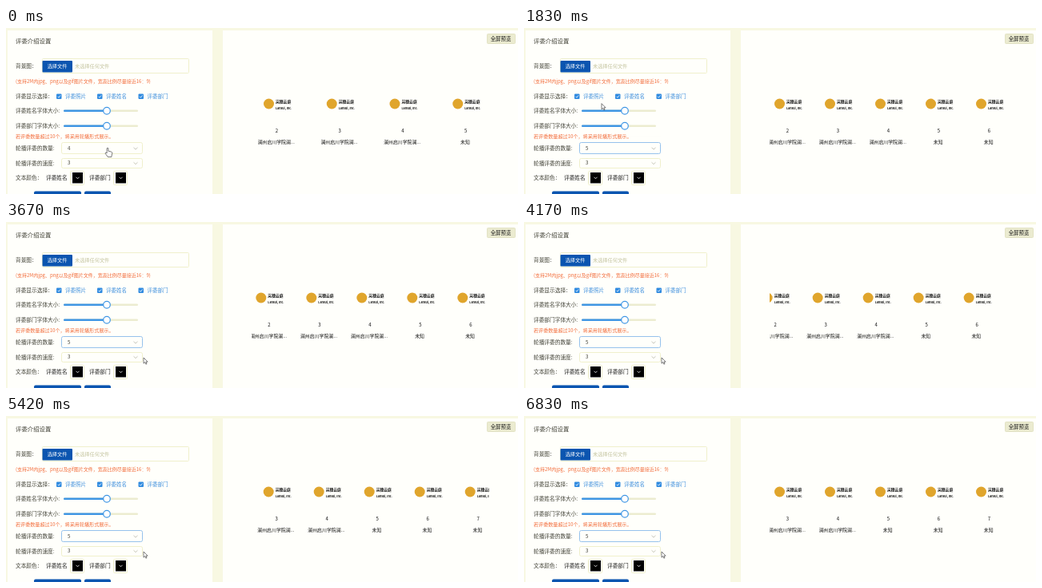
Write an HTML page that moves like this. It is 640 by 208 pixels and loops after 8 s.

```html
<!DOCTYPE html>
<html lang="zh-CN">
<head>
<meta charset="utf-8">
<title>评委介绍设置</title>
<style>
  html, body { margin: 0; width: 100%; height: 100%; overflow: hidden; background: #fffffb; }
  svg { display: block; }
  text { font: 6.7px "Noto Sans CJK SC", "Noto Sans CJK", "Noto Sans", sans-serif; fill: #404036; dominant-baseline: central; }
  #form text, #menu text { transform: translateY(-.6px); }
  .small { font-size: 6.2px; }
  .warn { font-size: 6px; fill: #f26a38; }
  .blue { font-size: 6.5px; fill: #3f8fdc; }
  .middle { text-anchor: middle; }
  .field { fill: #fffffb; stroke: #f0f0cc; }
  .button { fill: #0b55b0; }
  .chevron { fill: none; stroke: #b8b8aa; stroke-width: .8; }
  .cursor { fill: #fff; stroke: #444; stroke-width: .7; stroke-linejoin: round; }
</style>
</head>
<body>
<svg width="640" height="208" viewBox="0 0 640 208">
  <defs><clipPath id="window"><rect x="307" y="60" width="297" height="100"/></clipPath></defs>
  <rect width="640" height="208" fill="#fffffb"/>
  <path d="M0 0H640V3H271V208H258V3H2V208H0Z" fill="#f8f8e2"/>

  <g id="form">
    <text x="12" y="16" style="font-size:7.4px">评委介绍设置</text>
    <text x="12" y="48">背景图：</text>
    <rect class="field" x="45.5" y="38.5" width="183" height="18" rx="1"/>
    <rect class="button" x="45.5" y="41" width="37.5" height="14.5" rx="1"/>
    <text class="small middle" x="64" y="48.5" style="fill:#fff">选择文件</text>
    <text class="small" x="86" y="48.5" style="fill:#c4c4a0">未选择任何文件</text>
    <text class="warn" x="12" y="67">(支持2M内jpg、png以及gif图片文件，宽高比例尽量接近16：9)</text>
    <text x="12" y="86">评委显示选择：</text>
    <text x="12" y="104">评委姓名字体大小:</text>
    <text x="12" y="123">评委部门字体大小:</text>
    <text class="warn" x="12" y="136.5" style="font-size:6.1px">若评委数量超过10个，将采用轮播形式展示。</text>
    <text x="12" y="151">轮播评委的数量:</text>
    <text x="12" y="169.5">轮播评委的速度:</text>
    <text x="12" y="188">文本颜色：</text>
    <text x="50" y="188" style="fill:#222">评委姓名</text>
    <text x="104" y="188" style="fill:#222">评委部门</text>
    <rect id="select" class="field" x="69.5" y="143.5" width="101" height="14" rx="2"/>
    <text id="value" class="small" x="77" y="151"></text>
    <path id="arrow" class="chevron" d="M-2.5 -1.2L0 1.2L2.5 -1.2"/>
    <rect class="field" x="69.5" y="163.5" width="101" height="12" rx="2"/>
    <text class="small" x="77" y="169.5">3</text>
    <path class="chevron" d="M159.5 168.3l2.5 2.4l2.5 -2.4"/>
    <rect class="button" x="35" y="204.5" width="59" height="16" rx="2"/>
    <rect class="button" x="98" y="204.5" width="33" height="16" rx="2"/>
  </g>

  <rect x="601.5" y="7.5" width="35" height="12" rx="1" fill="#ebebd0" stroke="#e2e2c4"/>
  <text class="middle" x="618.5" y="13" style="font-size:6.4px;fill:#111">全屏预览</text>
  <g id="carousel" clip-path="url(#window)"></g>

  <g id="menu">
    <rect class="field" x="69.5" y="12.5" width="101" height="123" rx="2"/>
    <rect id="hover" x="70" width="96" height="16" fill="#f8f8ee"/>
    <g id="options"></g>
    <rect id="scrollbar" x="166" y="15" width="3" height="108" rx="1.5" fill="#d6d7d2"/>
  </g>

  <path id="hand" class="cursor" d="M-.9 .8Q0 -.7 .9 .8V4.2L4.7 5.1Q6 5.6 5.7 7.2L4.8 11.6H.3L-2.8 7.3Q-3 5.9-1.8 6.1L-.9 7Z"/>
  <path id="pointer" class="cursor" d="M0 0V7.2L1.7 5.7L2.9 8.2L4 7.7L2.9 5.2H5.1Z"/>
</svg>

<script>
const LOOP = 8000, STEP = 1000 / 12, PICK = 1648;
const $ = id => document.getElementById(id);

function add(parent, tag, attributes, content = "") {
  const node = document.createElementNS("http://www.w3.org/2000/svg", tag);
  for (const name in attributes) node.setAttribute(name, attributes[name]);
  node.textContent = content;
  return parent.appendChild(node);
}

const clamp = v => Math.min(1, Math.max(0, v));

// CSS-style cubic-bezier timing function, solved by bisection.
function bezier(x1, y1, x2, y2) {
  const at = (s, a, b) => 3 * a * s * (1 - s) ** 2 + 3 * b * s * s * (1 - s) + s ** 3;
  return x => {
    if (x <= 0 || x >= 1) return clamp(x);
    let low = 0, high = 1;
    for (let i = 0; i < 24; i++) {
      const mid = (low + high) / 2;
      if (at(mid, x1, x2) < x) low = mid; else high = mid;
    }
    return at(low, y1, y2);
  };
}
const ease = bezier(.25, .1, .25, 1);
const easeOut = bezier(.23, 1, .32, 1);

// Repeated form controls
[["评委照片", 63], ["评委姓名", 114], ["评委部门", 165.5]].forEach(([label, x]) => {
  add($("form"), "rect", { x, y: 82.5, width: 6.5, height: 6.5, rx: 1, fill: "#318be0" });
  add($("form"), "path", { d: `M${x + 1.5} 85.8l1.4 1.4l2.2 -2.8`, fill: "none", stroke: "#fff", "stroke-width": .8 });
  add($("form"), "text", { x: x + 11, y: 86, class: "blue" }, label);
});
for (const y of [104, 123]) {
  add($("form"), "rect", { x: 72, y: y - 1.5, width: 93, height: 2.5, rx: 1.2, fill: "#ececd0" });
  add($("form"), "rect", { x: 72, y: y - 1.5, width: 54, height: 2.5, rx: 1.2, fill: "#3f96e4" });
  add($("form"), "circle", { cx: 126, cy: y - .25, r: 4.3, fill: "#fff", stroke: "#3f96e4", "stroke-width": 1.2 });
}
for (const x of [81, 135]) {
  add($("form"), "rect", { x: x - .5, y: 179.5, width: 17, height: 17, rx: 1, class: "field" });
  add($("form"), "rect", { x: x + 2, y: 181, width: 13, height: 13.5 });
  add($("form"), "path", { d: `M${x + 6.5} 186.8l2 2l2 -2`, fill: "none", stroke: "#fff", "stroke-width": .8 });
}

const options = [1, 2, 3, 4, 5, 6, 7].map(n =>
  add($("options"), "text", { x: 79, y: 9 + 16 * n, class: "small" }, n));

const slides = [1, 2, 3, 4, 5, 6, 7].map(n => {
  const node = add($("carousel"), "g", {});
  const write = (x, y, size, content, style = "text-anchor:middle") => add(node, "text",
    { x, y, style: `font-size:${size}px;fill:#111;${style}` }, content);
  add(node, "circle", { cx: -10, cy: 95, r: 6.5, fill: "#e0a52c" });
  write(-1.5, 91, 4.8, "岚穗云庭", "font-weight:bold");
  write(-1.5, 100.5, 3.6, "Lansui, Inc.", "font-weight:bold");
  write(0, 128.5, 6, n);
  write(-.8, 142, 5.9, n < 5 ? "澜州启川学院澜..." : "未知");
  return { n, node };
});

// Cursor stops: time, x, y
const path = [
  [0, 127, 150], [250, 127, 150], [670, 97, 90], [917, 97, 86], [1667, 97, 86],
  [2167, 97, 112], [2333, 192, 160], [2417, 171, 168], [2583, 171, 169], [2667, 172, 170], [LOOP, 172, 170]
];
function cursorAt(t) {
  const i = path.findIndex(stop => stop[0] > t);
  const [t0, x0, y0] = path[i - 1], [t1, x1, y1] = path[i];
  const p = (t - t0) / (t1 - t0);
  return [x0 + (x1 - x0) * p, y0 + (y1 - y0) * p];
}

function draw(t) {
  const picked = t >= PICK;
  const open = picked ? 1 - easeOut((t - PICK) / 300) : easeOut((t - 60) / 300);
  const [x, y] = cursorAt(t);

  $("value").textContent = picked ? 5 : 4;
  $("select").style.stroke = t > 60 ? "#96c2ec" : "";
  $("arrow").setAttribute("transform", `translate(162 151) rotate(${180 * open})`);
  $("menu").setAttribute("transform", `translate(0 136) scale(1 ${open}) translate(0 -136)`);
  $("menu").setAttribute("opacity", open);
  $("scrollbar").setAttribute("opacity", clamp((t - 580) / 340));
  const row = Math.floor((y - 1) / 16);
  $("hover").setAttribute("y", 1 + 16 * row);
  $("hover").setAttribute("opacity", row < 8 ? 1 : 0);
  options.forEach((node, i) => node.style.fill = i + 1 === (picked ? 5 : 4) ? "#318be0" : "");

  const count = picked ? 5 : 4;
  const width = (297 - 18 * (count - 1)) / count;
  const first = picked ? 2 + ease((t - 3600) / 3200) : 1 + ease((t + 2700) / 3200);
  for (const { n, node } of slides)
    node.setAttribute("transform", `translate(${307 + width / 2 + (n - first) * (width + 18)} 0)`);

  const isHand = t < 1750;
  $("hand").setAttribute("visibility", isHand ? "visible" : "hidden");
  $("pointer").setAttribute("visibility", isHand ? "hidden" : "visible");
  $(isHand ? "hand" : "pointer").setAttribute("transform", `translate(${x} ${y})`);
}

// Twelve steps a second, with every sixth step held.
const start = performance.now();
function tick() {
  const t = (performance.now() - start) % LOOP;
  let step = Math.min(95, Math.floor((t + 4) / STEP));
  if (step % 6 === 3) step--;
  draw(step * STEP);
  requestAnimationFrame(tick);
}
tick();
</script>
</body>
</html>
```
